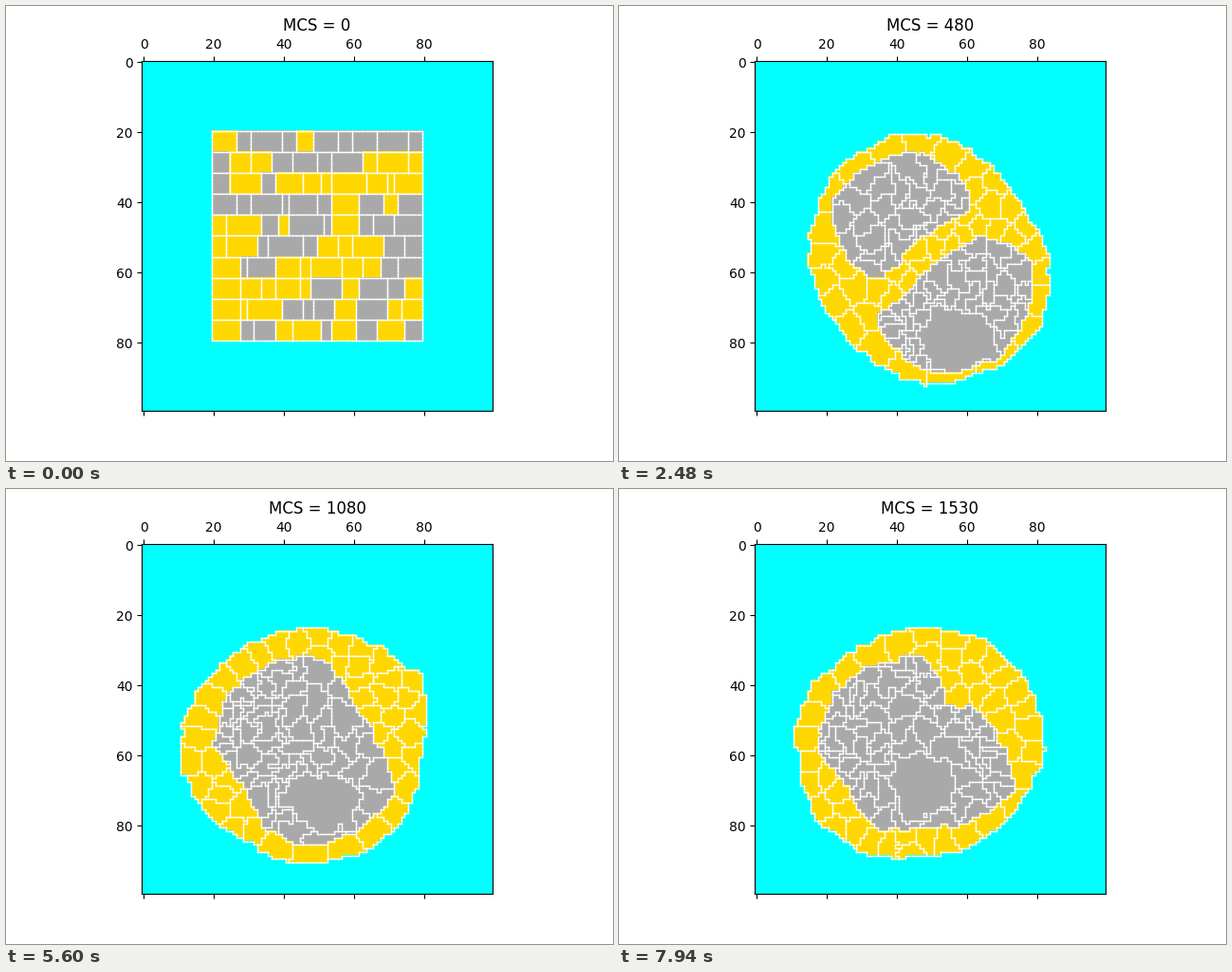
Recreate the animation shown at these times as a matplotlib script. Size 640x480 px, loop 8000 ms.

```python
import numpy as np
import matplotlib.pyplot as plt
from matplotlib.animation import FuncAnimation
from matplotlib.colors import ListedColormap

N = 100                 # lattice sites per side
STEP = 10               # Monte Carlo steps between pictures
LAST = 153              # index of the final picture
TICK = 20               # ms
GREY, LUMP = 200, 500   # label offsets
ANGLES = np.linspace(0, 2 * np.pi, 96, endpoint=False)
SITES = np.mgrid[0:N, 0:N][::-1] + 0.5
rng = np.random.default_rng(7)


def lerp(a, b, t):
    return a + (b - a) * t


def dist(a, b):
    return np.hypot(a[:, None, 0] - b[None, :, 0], a[:, None, 1] - b[None, :, 1])


def radii(values):
    """Spread a few evenly spaced radii over all angles."""
    at = np.linspace(0, 2 * np.pi, len(values), endpoint=False)
    return np.interp(ANGLES, at, values, period=2 * np.pi)


def gap(centre, r, x, y):
    """Radial distance to an outline, negative inside."""
    x, y = x - centre[0], y - centre[1]
    return np.hypot(x, y) - np.interp(np.arctan2(y, x), ANGLES, r, period=2 * np.pi)


def segment(ax, ay, bx, by, x, y):
    ux, uy = bx - ax, by - ay
    s = np.clip(((x - ax) * ux + (y - ay) * uy) / (ux * ux + uy * uy), 0, 1)
    return np.hypot(x - ax - s * ux, y - ay - s * uy)


def core_gap(k, x, y):
    """Negative in the grey core, which the golden band may split."""
    b = k["band"]
    bridge = np.minimum(segment(*b[:4], x, y), segment(*b[2:6], x, y))
    return np.maximum(gap(k["centre"], k["core"], x, y), b[6] - bridge)


def lump_gap(k, x, y):
    cx, cy, rx, ry = k["lump"]
    return np.hypot((x - cx) / rx, (y - cy) / ry) - 1


def spread(mask, area, rounds):
    """Seeds for cells of roughly equal area that fill the mask."""
    p = SITES[:, mask].T
    seeds = rng.permutation(p)[:len(p) // area]
    for _ in range(rounds):
        owner = dist(p, seeds).argmin(1)
        seeds = np.array([p[owner == j].mean(0) for j in np.unique(owner)])
    return seeds


def pair(a, b):
    """Match two seed sets greedily, nearest first."""
    if len(a) < len(b):
        return pair(b, a)[::-1]
    d = dist(a, b)
    to = d.argmin(1)
    for _ in b:
        r, c = np.unravel_index(d.argmin(), d.shape)
        to[r] = c
        d[r] = np.inf
        d[:, c] = np.inf
    return a, b[to]


# Starting wall of bricks: widths per row, negative means grey
ROWS = [
    [7, -4, -9, -4, 5, -7, -4, -7, -9, -4],
    [-5, 6, 6, -6, -7, -4, -9, 4, 9, 4],
    [-5, 9, -4, 8, 5, 3, 10, 6, 2, 8],
    [-7, -4, -9, -2, -8, -4, 8, -7, 4, -7],
    [4, 10, -5, 3, -10, -2, 8, -4, -6, -8],
    [4, 9, -3, -10, -4, 6, 4, 9, -6, -5],
    [8, -2, -8, 7, 3, 9, 6, 5, -5, -7],
    [8, 6, 4, 7, 3, -9, 5, -8, -5, 5],
    [8, 2, 10, -6, -3, -6, 6, -9, 4, 6],
    [8, -4, -6, 5, 8, -3, 7, -6, 8, -5],
]


def bricks():
    lab = np.zeros((N, N), int)
    gold, grey = [], []
    for j, row in enumerate(ROWS):
        x, y = 20, 20 + 6 * j
        for w in row:
            group, base = (gold, 1) if w > 0 else (grey, GREY)
            lab[y:y + 6, x:x + abs(w)] = base + len(group)
            group.append((x + abs(w) / 2, y + 3))
            x += abs(w)
    return lab, np.array(gold), np.array(grey)


def key(mcs, outline, core, lump, band):
    k = dict(at=mcs // STEP, centre=np.array([48, 57]), outline=radii(outline),
             core=radii(core), lump=np.array(lump), band=np.array(band))
    inside = gap(k["centre"], k["outline"], *SITES) < 0
    dark = inside & (core_gap(k, *SITES) < 0)
    k["gold"] = spread(inside & ~dark, 40, 9)
    k["grey"] = spread(dark & (lump_gap(k, *SITES) > 0), 26, 2)
    return k


# Outline and core: twelve radii, clockwise from the right.
# Band: three points and a half width.
wide = [61, 39, 55, 54, 28, 63, 4.5]
thin = [65, 44, 50, 54, 37, 67, 4]
gone = thin[:6] + [-1]
settled = [19, 27, 28, 29, 27, 22, 27, 27, 26, 25, 19, 16]

wall, gold0, grey0 = bricks()
keys = [
    key(210, [37, 35, 35.5, 29.5, 27, 30, 34.5, 37, 36.5, 36, 34.5, 34.5],
        [35, 32, 29.5, 27, 21, 14, 18, 35, 31, 30, 25, 15], [55, 76, 11, 9], wide),
    key(480, [36, 38, 36, 35, 31, 31, 32.5, 34, 36, 36, 33.5, 31.5],
        [30, 34, 34.5, 31, 23, 11, 21, 30, 31, 30.5, 24, 14], [58, 80, 11, 9], thin),
    key(830, [35.5, 32, 33, 34.5, 35, 35, 35.5, 33, 32.5, 35, 33.5, 33],
        settled, [50, 72, 10, 9], gone),
    key(1080, [31.5, 33.5, 34.5, 34, 33.5, 36, 37, 35, 32.5, 33, 32.5, 37],
        settled, [52, 74, 11, 9], gone),
    key(1360, [33.5, 30, 35.5, 38, 34.5, 36, 35, 35.5, 31, 31.5, 35.5, 34],
        settled, [49, 77, 9, 10], gone),
    key(1530, [34.5, 32.5, 32, 32, 35.5, 37, 36.5, 35.5, 32.5, 33, 33.5, 34],
        [22, 29, 25.5, 24, 28.5, 24, 30.5, 29, 26, 24, 13, 19], [48, 69, 9, 10], gone),
]
square = 30 / np.maximum(abs(np.cos(ANGLES)), abs(np.sin(ANGLES)))
first = dict(keys[0], at=0, centre=np.array([50, 50]), outline=square, gold=gold0, grey=grey0)
first["lump"] = np.array([55, 76, 1, 1])
keys.insert(0, first)
spans = [(a, b, pair(a["gold"], b["gold"]), pair(a["grey"], b["grey"]))
         for a, b in zip(keys, keys[1:])]


def ripple():
    """Smooth random displacement field with unit spread."""
    f = rng.normal(size=(2, N, N))
    for axis in (1, 2, 1, 2):
        f = f + np.roll(f, 1, axis) + np.roll(f, -1, axis)
    return f / f.std()


def cells(i, noise):
    if i == 0:
        return wall
    n = next(j for j, s in enumerate(spans) if i <= s[1]["at"])
    a, b, gold, grey = spans[n]
    t = (i - a["at"]) / (b["at"] - a["at"])
    mix = 1 if n else t ** 3
    t = t if n else t ** 0.7
    k = {name: lerp(a[name], b[name], t) for name in ("centre", "outline", "core", "lump", "band")}

    soft = SITES + 0.4 * noise
    inside = gap(k["centre"], k["outline"], *soft) < 0
    p = soft[:, inside].T
    q = (SITES + 1.15 * noise)[:, inside].T
    to_gold = dist(p, lerp(*gold, t))
    to_grey = dist(q, lerp(*grey, t))
    side = mix * core_gap(k, *p.T) + (1 - mix) * (to_grey.min(1) - to_gold.min(1))
    dark = np.where(lump_gap(k, *q.T) < 0, LUMP, GREY + to_grey.argmin(1))
    lab = np.zeros((N, N), int)
    lab[inside] = np.where(side < 0, dark, 1 + to_gold.argmin(1))
    return lab


def borders(lab):
    """Unit segments between sites that belong to different cells."""
    r, c = np.nonzero(lab[:, 1:] != lab[:, :-1])
    v, h = np.nonzero(lab[1:] != lab[:-1])
    gaps = np.full(len(r) + len(v), np.nan)
    x = [np.r_[c + 0.5, h - 0.5], np.r_[c + 0.5, h + 0.5], gaps]
    y = [np.r_[r - 0.5, v + 0.5], np.r_[r + 0.5, v + 0.5], gaps]
    return np.column_stack(x).ravel(), np.column_stack(y).ravel()


pictures = []
noise = ripple()
for i in range(LAST + 1):
    lab = cells(i, noise)
    pictures.append(((lab > 0) + 1 * (lab >= GREY), borders(lab)))
    noise = 0.9 * noise + 0.436 * ripple()

# Pictures stay 20, 100, 20, 100, 20 ms in turn
holds = np.resize([1, 5, 1, 5, 1], LAST)
starts = np.r_[0, holds.cumsum()]

fig, ax = plt.subplots(figsize=(6.4, 4.8), dpi=100)
image = ax.matshow(pictures[0][0], cmap=ListedColormap(["cyan", "gold", "darkgray"]), vmin=0, vmax=2)
ax.autoscale(False)
walls, = ax.plot([], [], color="white", lw=1)
walls.set_snap(True)
title = ax.set_title("MCS = 0")


def update(tick):
    i = np.searchsorted(starts, tick, side="right") - 1
    kinds, lines = pictures[i]
    image.set_data(kinds)
    walls.set_data(*lines)
    title.set_text(f"MCS = {i * STEP}")
    return image, walls, title


anim = FuncAnimation(fig, update, frames=8000 // TICK, interval=TICK, repeat=True, repeat_delay=0)
plt.show()
```
